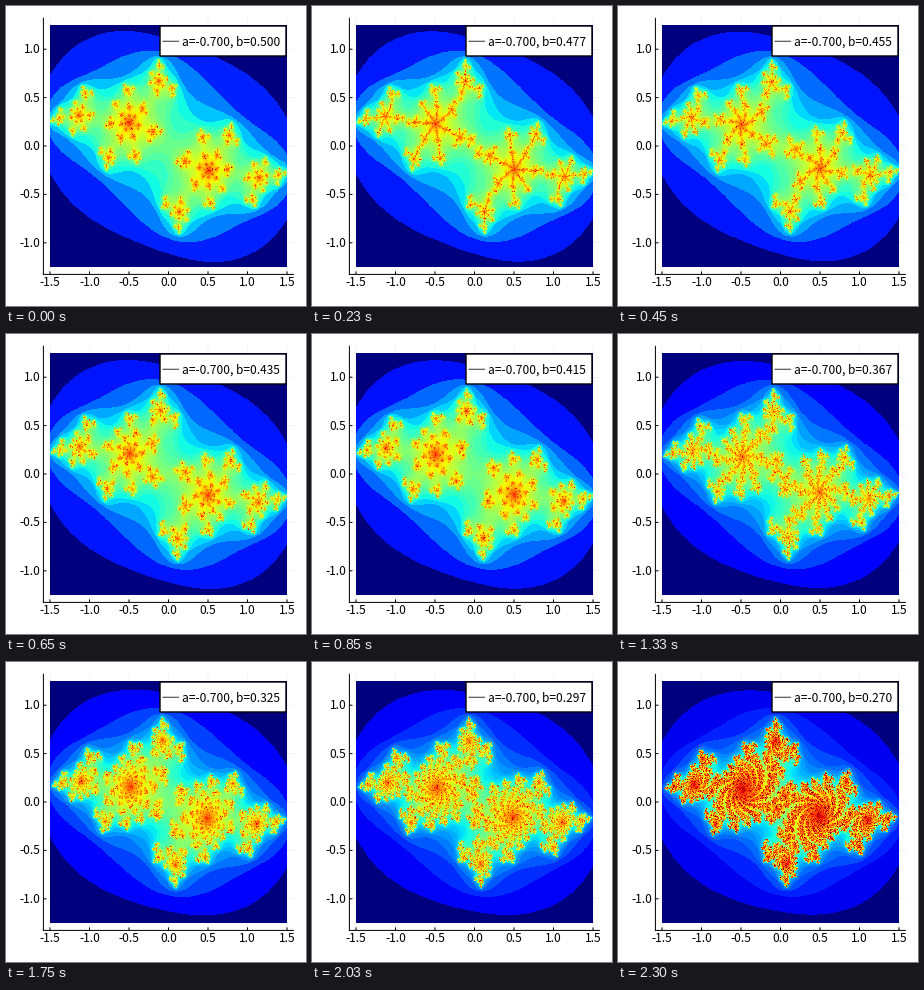
Animation of 300x300 px, one loop 2.32 s. Source, as a matplotlib script:

```python
import numpy as np
import matplotlib.pyplot as plt
from matplotlib.animation import FuncAnimation
from matplotlib.patches import Rectangle

SIZE = 300
LEFT, RIGHT, TOP, BOTTOM = 44, 281, 19, 261   # heatmap box in pixels
X_MAX, Y_MAX = 1.5, 1.25
TICK_MS, LOOP_MS, STEP_MS = 10, 2320, 25
GRID, MAX_ITER = 500, 1000
A, B_START, B_STEP = -0.7, 200, 400           # b = (B_START - step) / B_STEP
FONT_PX = 12
PX = 0.72                                     # points per pixel


def to_px(x):
    return (LEFT + RIGHT) / 2 + x * (RIGHT - LEFT) / (2 * X_MAX)


def to_py(y):
    return (TOP + BOTTOM) / 2 - y * (BOTTOM - TOP) / (2 * Y_MAX)


def nearest(count):
    """Grid index drawn at each of count pixels."""
    return np.arange(count) * GRID // count


# The set is point-symmetric, so only the upper half is iterated.
xs = np.linspace(-X_MAX, X_MAX, GRID)
ys = np.linspace(Y_MAX, -Y_MAX, GRID)[:GRID // 2]
UPPER = xs[None, :] + 1j * ys[:, None]
PIXELS = np.ix_(nearest(BOTTOM - TOP), nearest(RIGHT - LEFT))


def julia(c):
    """Logarithm of the escape time of z -> z^2 + c."""
    z = UPPER.ravel().copy()
    alive = np.arange(z.size)
    count = np.full(z.size, MAX_ITER)
    for n in range(1, MAX_ITER):
        z = z * z + c
        out = z.real ** 2 + z.imag ** 2 > 4
        if out.any():
            count[alive[out]] = n
            z, alive = z[~out], alive[~out]
        if not alive.size:
            break
    half = np.log(count).reshape(UPPER.shape)
    return np.vstack([half, half[::-1, ::-1]])


fig = plt.figure(figsize=(3, 3), dpi=100, facecolor="white")
ax = fig.add_axes([0, 0, 1, 1])
ax.axis("off")


def line(x0, y0, x1, y1, **style):
    style = {"color": "black", "lw": PX, "solid_capstyle": "butt",
             "snap": False, "zorder": 2, **style}
    ax.plot([x0, x1], [y0, y1], **style)


def label(x, y, text, ha):
    return ax.text(x, y, text, ha=ha, va="baseline",
                   family="Noto Sans CJK JP", size=FONT_PX * PX,
                   color="black", zorder=5)


image = ax.imshow(np.zeros((BOTTOM - TOP, RIGHT - LEFT)), cmap="jet",
                  extent=(LEFT, RIGHT, BOTTOM, TOP), zorder=1,
                  interpolation="nearest", aspect="auto")

# Axes with inward ticks; the faint grid shows only in the margin
X0, X1, Y0, Y1 = 37.4, 288, 268.4, 11.8
GRID_STYLE = {"alpha": 0.1, "lw": 0.5 * PX, "zorder": 0}
line(X0, Y1, X0, Y0 + 0.5)
line(X0 - 0.5, Y0, X1, Y0)
for v in np.arange(-1.5, 1.6, 0.5):
    px = to_px(v)
    line(px, Y0, px, Y1, **GRID_STYLE)
    line(px, Y0, px, Y0 - 3)
    label(px, 279.5, f"{v:.1f}", "center")
for v in np.arange(-1, 1.1, 0.5):
    py = to_py(v)
    line(X0, py, X1, py, **GRID_STYLE)
    line(X0, py, X0 + 3, py)
    label(34.5, py + 4, f"{v:.1f}", "right")

# Legend
ax.add_patch(Rectangle((154, 20), 126, 30, fc="white", ec="black",
                       lw=1.4 * PX, snap=False, zorder=3))
line(156.5, 35.2, 173, 35.2, lw=0.8 * PX, zorder=4)
caption = label(176, 39.5, "", "left")

ax.set_xlim(0, SIZE)
ax.set_ylim(SIZE, 0)

shown = {"step": None}


def update(tick):
    step = tick * TICK_MS // STEP_MS
    if step != shown["step"]:
        shown["step"] = step
        b = (B_START - step) / B_STEP
        data = julia(complex(A, b))
        image.set_data(data[PIXELS])
        image.set_clim(0, data.max())
        caption.set_text(f"a={A:.3f}, b={b:.3f}")
    return image, caption


anim = FuncAnimation(fig, update, frames=LOOP_MS // TICK_MS,
                     interval=TICK_MS, repeat=True, repeat_delay=0)
plt.show()
```
